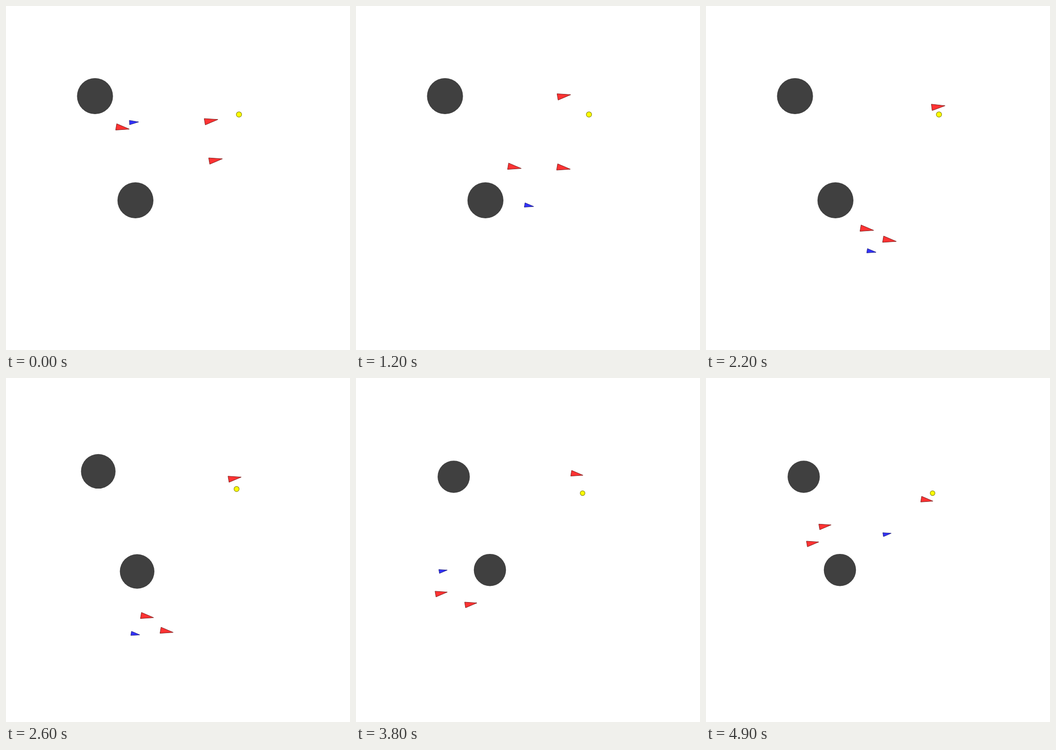
Animation, 700 px wide and 700 px high, one loop 5 s. Source, as an HTML page with a canvas:

```html
<!DOCTYPE html>
<html lang="en">
<head>
<meta charset="utf-8">
<title>Pursuit</title>
<style>
  html, body { margin: 0; width: 100%; height: 100%; overflow: hidden; background: #fff; }
  canvas { display: block; width: 100vw; height: 100vh; }
</style>
</head>
<body>
<canvas id="stage" width="700" height="700"></canvas>
<script>
const ctx = document.getElementById('stage').getContext('2d');
const LOOP = 5000, STEP = 100, MID = 350, MAX_TILT = 0.168;
const RED = ['#ff3333', '#7a1a1a', 1], BLUE = ['#3333ff', '#1a1a7a', 0.68];
const clamp = (v, lo, hi) => Math.min(hi, Math.max(lo, v));

// Turning points of each agent: [ms, x, y], joined by a smooth curve.
const agents = [
  { look: RED, path: [
    [0, 237, 246], [700, 308, 275.5], [1700, 326.6, 385.5], [2200, 327.3, 452],
    [3100, 215, 518.5], [3500, 147, 488], [3800, 152.6, 450.2], [4900, 229.3, 297.5]] },
  { look: RED, path: [
    [0, 417.2, 235.5], [700, 417.2, 207.3], [1200, 423, 185], [1700, 451, 191.3],
    [2200, 472.2, 206.3], [3100, 462, 181], [3350, 461, 145], [3800, 461, 175.5],
    [4200, 461, 223], [4900, 461, 234.4]] },
  { look: RED, path: [
    [0, 426.3, 315.5], [700, 426.3, 267.2], [1700, 411.2, 408.7], [2200, 373.2, 474.5],
    [3100, 266.2, 558.2], [3600, 231, 511], [3800, 219.8, 474.9], [4900, 201.2, 336.3]] },
  { look: BLUE, path: [
    [0, 260, 237.2], [150, 262, 236.6], [700, 320, 330.3], [1550, 370, 450],
    [1700, 370.7, 444.5], [1800, 367, 447], [2200, 336.5, 498], [3100, 170, 532.5],
    [3800, 156.7, 398.8], [4500, 285, 320], [4900, 370.4, 315.1]] }
];

// Value and speed (px per ms) of one coordinate on the curve.
function sample(path, t, axis) {
  const last = path.length - 1;
  let i = 0;
  while (i < last - 1 && path[i + 1][0] <= t) i++;
  const slope = k => {
    const a = path[Math.max(k - 1, 0)], b = path[Math.min(k + 1, last)];
    return (b[axis] - a[axis]) / (b[0] - a[0]);
  };
  const h = path[i + 1][0] - path[i][0], u = (t - path[i][0]) / h;
  const p = path[i][axis], d = path[i + 1][axis] - p;
  const m = slope(i) * h, n = slope(i + 1) * h;
  const c2 = 3 * d - 2 * m - n, c3 = m + n - 2 * d;
  return {
    value: p + u * (m + u * (c2 + u * c3)),
    speed: (m + u * (2 * c2 + 3 * u * c3)) / h
  };
}

function paint(fill, stroke) {
  ctx.fillStyle = fill;
  ctx.fill();
  if (!stroke) return;
  ctx.strokeStyle = stroke;
  ctx.stroke();
}

function disc(x, y, r, fill, stroke) {
  ctx.beginPath();
  ctx.arc(x, y, r, 0, 2 * Math.PI);
  paint(fill, stroke);
}

// A dart that tips up or down with its vertical speed.
function dart({ look: [fill, stroke, size], path }, t) {
  const x = sample(path, t, 1).value, y = sample(path, t, 2);
  ctx.save();
  ctx.translate(x - 12.8 * size, y.value);
  ctx.rotate(clamp(y.speed / 0.01, -1, 1) * MAX_TILT);
  ctx.beginPath();
  ctx.moveTo(0, -6.5 * size);
  ctx.lineTo(27.2 * size, 0);
  ctx.lineTo(0, 6.5 * size);
  ctx.closePath();
  paint(fill, stroke);
  ctx.restore();
}

function draw(t) {
  const zoom = 1 - 0.105 * clamp((t - 2300) / 800, 0, 1);
  ctx.setTransform(1, 0, 0, 1, 0, 0);
  ctx.clearRect(0, 0, 700, 700);
  ctx.translate(MID, MID);
  ctx.scale(zoom, zoom);
  ctx.translate(-MID, -MID);
  ctx.lineWidth = 0.9 / zoom;
  disc(181.1, 183.4, 36.6, '#404040');
  disc(263.4, 395.4, 36.6, '#404040');
  for (const agent of agents) dart(agent, t);
  ctx.lineWidth = 1.2 / zoom;
  disc(474.1, 220.8, 5.4, '#ffff00', '#8c8c10');
}

const start = performance.now();
function tick() {
  const t = (performance.now() - start) % LOOP;
  draw(Math.floor(t / STEP) * STEP);
  requestAnimationFrame(tick);
}
tick();
</script>
</body>
</html>
```
